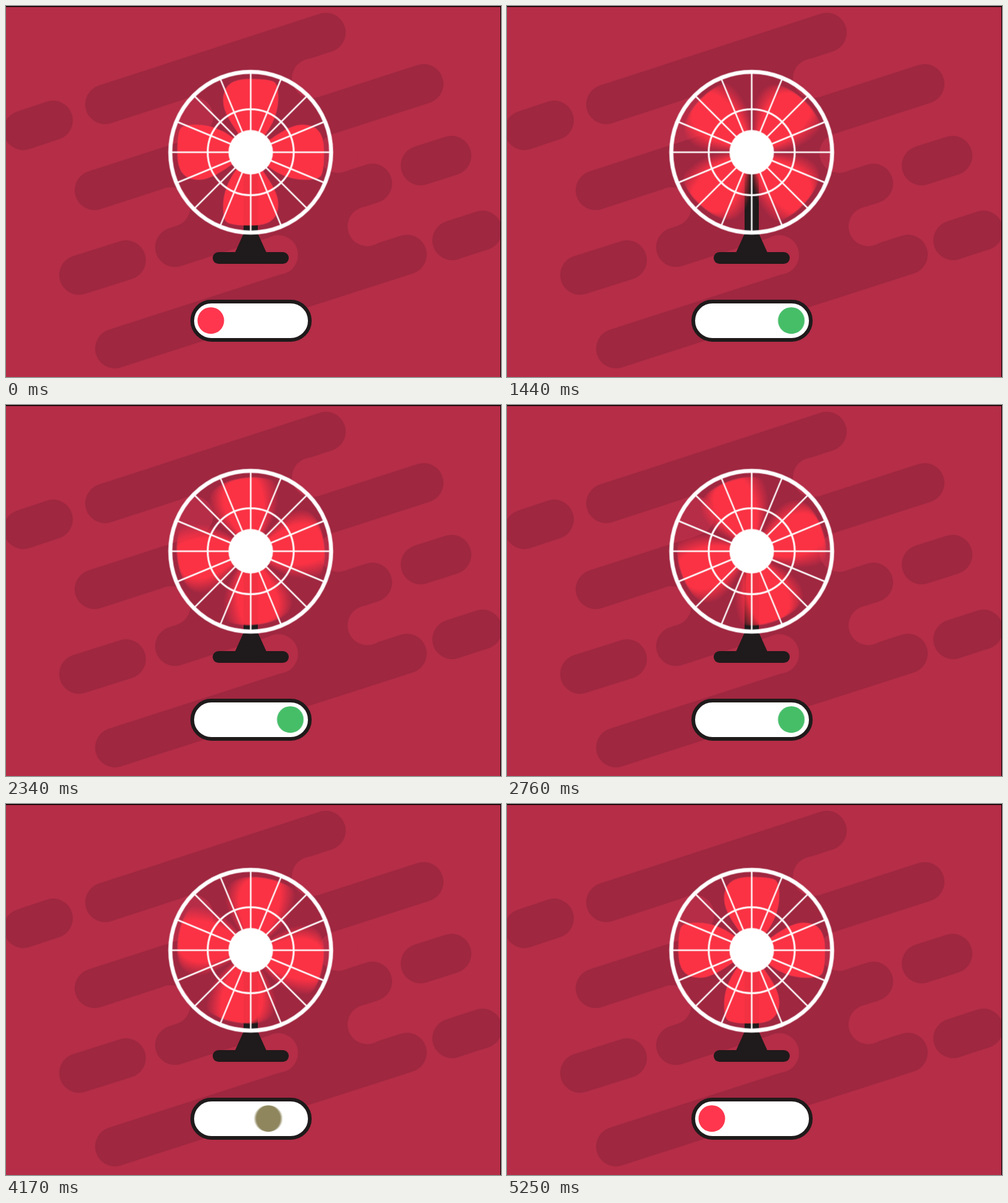
Animation of 800x600 px, one loop 5.4 s. Source, as an HTML page without scripts:

```html
<!DOCTYPE html>
<html lang="en">
<head>
<meta charset="utf-8">
<title>Fan switch</title>
<style>
  html, body { margin: 0; width: 100%; height: 100%; overflow: hidden; background: #b52d47; }
  svg { display: block; width: 800px; height: 600px; }

  .bars { fill: none; stroke: #9f2740; stroke-width: 64; stroke-linecap: round; }
  .fill { stroke-linecap: butt; stroke-width: 68; }
  .gaps { fill: #b52d47; }
  .ink { fill: #1f1a1b; }
  .cage { fill: none; stroke: #fff; }

  /* Motion blur: time-shifted copies are added up */
  .blur { isolation: isolate; }
  .blur > * { mix-blend-mode: plus-lighter; }
  .blades > use {
    opacity: .0625;
    animation: spin 5.4s calc((var(--i) - 7.5) * 1ms) infinite linear;
  }
  .knob > circle {
    opacity: .125;
    fill: #ff3044;
    animation: slide 5.4s infinite linear, tint 5.4s infinite linear;
    animation-delay: calc((var(--i) - 3.5) * 2ms);
  }

  /* 11 turns: speed up, run steadily, slow down */
  @keyframes spin {
    0% { transform: rotate(0deg); }
    6.019% { transform: rotate(0deg); animation-timing-function: cubic-bezier(.3333, 0, .6667, .3333); }
    20.278% { transform: rotate(401.75deg); }
    76.296% { transform: rotate(3558.25deg); animation-timing-function: cubic-bezier(.3333, .6667, .6667, 1); }
    90.556%, 100% { transform: rotate(3960deg); }
  }
  @keyframes slide {
    0% { transform: translateX(0); }
    1.02% { transform: translateX(0); animation-timing-function: cubic-bezier(.55, 0, .45, 1); }
    16.2% { transform: translateX(128.5px); }
    71.3% { transform: translateX(128.5px); animation-timing-function: cubic-bezier(.55, 0, .45, 1); }
    86.48%, 100% { transform: translateX(0); }
  }
  @keyframes tint {
    0%, 1.02% { fill: #ff3044; }
    16.2%, 71.3% { fill: #3bb662; }
    86.48%, 100% { fill: #ff3044; }
  }
</style>
</head>
<body>
<svg viewBox="0 0 800 600">
  <defs>
    <path id="blade" d="M0 0C-20 -34 -44.5 -58 -44.5 -84C-44.5 -108 -30 -118.5 -2 -118.5C14 -118.5 26 -118 35 -115C44 -112 44.5 -100 44.5 -88C44.5 -62 33 -40 20 -24Z"/>
    <g id="rotor" fill="#ff3044">
      <use href="#blade"/>
      <use href="#blade" transform="rotate(90)"/>
      <use href="#blade" transform="rotate(180)"/>
      <use href="#blade" transform="rotate(270)"/>
    </g>
    <path id="spoke" d="M-130 0H130"/>
  </defs>

  <rect width="800" height="600" fill="#b52d47"/>

  <g class="bars">
    <path d="M160 159L517 43M143 298L675 126M273 390L592 287M176 554L648 402"/>
    <path d="M28 201L76 185M118 435L194 411M670 258L720 242M721 379L770 363"/>
    <path class="fill" d="M303 179L494 117M266 325L537 238M440 402.5L584 356"/>
  </g>
  <g class="gaps">
    <circle cx="494" cy="117" r="32"/>
    <circle cx="303" cy="179" r="32"/>
    <circle cx="266" cy="325" r="32"/>
    <circle cx="537" cy="238" r="32"/>
    <circle cx="440" cy="402.5" r="32"/>
    <circle cx="584" cy="356.5" r="32"/>
  </g>
  <path d="M0 0H800V600H799V1.5H0Z"/>

  <g class="ink">
    <path d="M384 236H407V368L421 399H370L384 368Z"/>
    <rect x="334" y="398" width="123" height="19" rx="9.5"/>
  </g>

  <g transform="translate(395.5 236.5)">
    <g class="blur blades">
      <use href="#rotor" style="--i:0"/>
      <use href="#rotor" style="--i:1"/>
      <use href="#rotor" style="--i:2"/>
      <use href="#rotor" style="--i:3"/>
      <use href="#rotor" style="--i:4"/>
      <use href="#rotor" style="--i:5"/>
      <use href="#rotor" style="--i:6"/>
      <use href="#rotor" style="--i:7"/>
      <use href="#rotor" style="--i:8"/>
      <use href="#rotor" style="--i:9"/>
      <use href="#rotor" style="--i:10"/>
      <use href="#rotor" style="--i:11"/>
      <use href="#rotor" style="--i:12"/>
      <use href="#rotor" style="--i:13"/>
      <use href="#rotor" style="--i:14"/>
      <use href="#rotor" style="--i:15"/>
    </g>
    <g class="cage" stroke-width="2.5">
      <use href="#spoke"/>
      <use href="#spoke" transform="rotate(22.5)"/>
      <use href="#spoke" transform="rotate(45)"/>
      <use href="#spoke" transform="rotate(67.5)"/>
      <use href="#spoke" transform="rotate(90)"/>
      <use href="#spoke" transform="rotate(112.5)"/>
      <use href="#spoke" transform="rotate(135)"/>
      <use href="#spoke" transform="rotate(157.5)"/>
      <circle r="69.5" stroke-width="3"/>
      <circle r="130" stroke-width="6.5"/>
    </g>
    <circle r="36" fill="#fff"/>
  </g>

  <rect x="301" y="478" width="190" height="62" rx="31" fill="#fff" stroke="#1f1a1b" stroke-width="6"/>
  <g class="blur knob">
    <circle cx="331" cy="508.7" r="21.5" style="--i:0"/>
    <circle cx="331" cy="508.7" r="21.5" style="--i:1"/>
    <circle cx="331" cy="508.7" r="21.5" style="--i:2"/>
    <circle cx="331" cy="508.7" r="21.5" style="--i:3"/>
    <circle cx="331" cy="508.7" r="21.5" style="--i:4"/>
    <circle cx="331" cy="508.7" r="21.5" style="--i:5"/>
    <circle cx="331" cy="508.7" r="21.5" style="--i:6"/>
    <circle cx="331" cy="508.7" r="21.5" style="--i:7"/>
  </g>
</svg>
</body>
</html>
```
